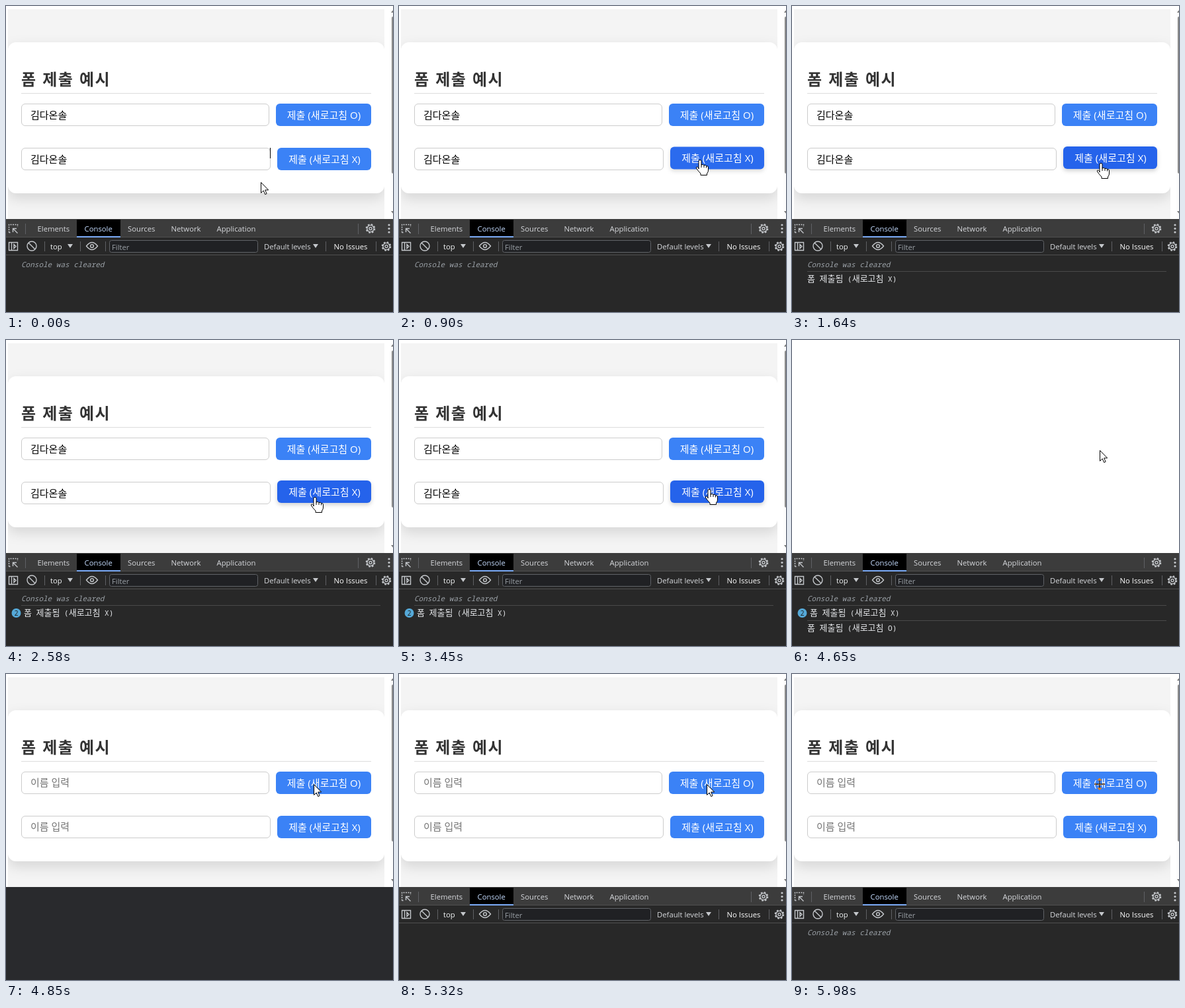
An HTML page that plays this animation: 585x464 px, repeating every 6.12 s.

```html
<!DOCTYPE html>
<html lang="ko">
<head>
<meta charset="utf-8">
<style>
html, body { margin: 0; width: 100%; height: 100%; overflow: hidden; background: #fff; }
svg { display: block; width: 585px; height: 464px; }
text { font-family: "Open Sans", "Noto Sans CJK KR", "Noto Sans CJK", sans-serif; }
.title { font: bold 24px "Noto Sans CJK KR", "Noto Sans CJK", sans-serif; letter-spacing: 1.4px; word-spacing: .7px; fill: #333; }
.page { font-size: 15px; }
.button { fill: #fff; text-anchor: middle; letter-spacing: .05px; }
.hint { fill: #757575; }
.field { fill: #fff; stroke: #ccc; }
.card { fill: #fff; filter: drop-shadow(0 8px 10px rgba(0, 0, 0, .12)); }
.tools text { font-size: 11.3px; fill: #d6d8dc; }
.tools .mono, .tools .mono tspan { font-family: "Noto Sans Mono", "Noto Sans CJK KR", "Noto Sans CJK", monospace; }
.tools .mono { font-size: 11px; fill: #e8eaed; }
.tools .note { font-style: italic; fill: #9aa0a6; }
.icon { fill: none; stroke: #c4c7cb; stroke-width: 1.4; }
.rule { stroke: #4a4a4a; }
.solid { fill: #c4c7cb; stroke: none; }
.cursor { fill: #fff; stroke: #000; stroke-linejoin: round; }
</style>
</head>
<body>
<svg viewBox="0 0 585 464">
  <defs>
    <clipPath id="view"><rect x="3" y="5" width="569" height="318"/></clipPath>
    <g id="gear" class="icon">
      <circle r="6.3" stroke-width="2" stroke-dasharray="2.6 2.35"/>
      <circle r="5.1"/><circle r="2"/>
    </g>
  </defs>

  <g id="site">
    <g clip-path="url(#view)">
      <rect x="3" y="5" width="569" height="318" fill="#f4f4f4"/>
      <rect class="card" x="3" y="55" width="569" height="229" rx="12"/>
    </g>
    <text class="title" x="23" y="120">폼 제출 예시</text>
    <path d="M23 132.5H552" stroke="#ddd"/>
    <rect class="field" x="23.5" y="148.5" width="374" height="33" rx="5.5"/>
    <rect class="field" x="23.5" y="215.5" width="376" height="33" rx="5.5"/>
    <g id="filled" class="page">
      <text x="37" y="170.5">김다온솔</text>
      <text x="37" y="237.5">김다온솔</text>
    </g>
    <g id="empty" class="page">
      <text class="hint" x="37" y="169.5">이름 입력</text>
      <text class="hint" x="37" y="236.5">이름 입력</text>
    </g>
    <g id="btnO">
      <rect x="408" y="148" width="144" height="34" rx="6"/>
      <text class="page button" x="480.5" y="170.5">제출 (새로고침 O)</text>
    </g>
    <g id="btnX">
      <rect x="410" y="215" width="142" height="34" rx="6"/>
      <text class="page button" x="481.5" y="237.5">제출 (새로고침 X)</text>
    </g>
    <path id="mark" d="M399.5 215V231" stroke="#000"/>
    <rect x="581" y="5" width="4" height="318" fill="#fcfcfc"/>
    <rect x="583" y="16" width="4" height="238" rx="2" fill="#8b8b8b"/>
    <path d="M582 10l4-5v5zM582 311h4v5z" fill="#777"/>
  </g>

  <rect y="323" width="585" height="141" fill="#292a2d"/>
  <g id="tools" class="tools">
    <rect y="323" width="585" height="28" fill="#3c3c3c"/>
    <rect y="351" width="585" height="113" fill="#282828"/>
    <rect x="107" y="324" width="66" height="27" fill="#000"/>
    <path d="M0 350.5H585M0 377.5H585" stroke="#505050"/>
    <path d="M107 350H173" stroke="#7cacf8" stroke-width="2"/>
    <text x="47.5" y="342">Elements</text>
    <text x="118.5" y="342" style="fill:#c5dcff">Console</text>
    <text x="184" y="342">Sources</text>
    <text x="249.5" y="342">Network</text>
    <text x="318.5" y="342">Application</text>
    <path d="M29.5 330V346M532.5 330V346M58.5 357V372M112.5 357V372M150.5 357V372M483.5 357V372M559.5 357V372" stroke="#5f6064"/>
    <g class="icon">
      <path d="M4.5 343.5V331.5H17.5V335M4.5 343.5H8" stroke-dasharray="2 1.5"/>
      <path d="M17.5 344.5L10.5 337.5M10.5 343V337.5H16"/>
      <path d="M4.5 358.5H17.5V370.5H4.5ZM8.5 358V371M12 361.5L15 364.5L12 367.5Z"/>
      <circle cx="39" cy="364" r="7"/><path d="M34 359L44 369"/>
      <path d="M121.5 364Q130 353 138.5 364Q130 375 121.5 364Z"/>
      <circle cx="130" cy="364" r="2.4"/>
      <g class="solid">
        <circle cx="579" cy="332" r="1.6"/><circle cx="579" cy="337.5" r="1.6"/><circle cx="579" cy="343" r="1.6"/>
        <path d="M93 361h8l-4 6zM464 361h8l-4 6z"/>
      </g>
    </g>
    <use href="#gear" x="551" y="337.5"/>
    <use href="#gear" x="575" y="364.5"/>
    <text x="67" y="369" style="fill:#f1f3f4">top</text>
    <rect x="156.5" y="355.5" width="224" height="18" rx="3" fill="#202124" stroke="#606367"/>
    <text x="160" y="370" style="fill:#9aa0a6">Filter</text>
    <text x="390" y="369">Default levels</text>
    <text x="495.5" y="369" style="fill:#fff">No Issues</text>
    <text id="cleared" class="mono note" x="23" y="396">Console was cleared</text>
    <g id="logX">
      <path class="rule" d="M23 402.5H566"/>
      <text class="mono log" id="lineX" y="418">폼 제출됨 (새로고침 X)</text>
      <g id="badge">
        <circle cx="15.5" cy="414" r="7" fill="#55a9d8"/>
        <text x="15.5" y="418" text-anchor="middle" style="font-size:10px;fill:#1b1b1b">2</text>
      </g>
    </g>
    <g id="logO">
      <path class="rule" d="M23 425.5H566"/>
      <text class="mono log" x="23" y="441">폼 제출됨 (새로고침 O)</text>
    </g>
    <path id="caret" d="M20.5 408V422" stroke="#d0d0d0"/>
  </g>

  <g id="pointer">
    <path id="arrow" class="cursor" d="M.5 .5V16.5L4.2 13L6.7 18.7L9.1 17.6L6.7 12H11.7Z"/>
    <g id="hand" class="cursor">
      <path d="M-2 14V2Q-2 .5 0 .5T2 2V8Q4.500 6.500 6 8.500Q8.500 7.500 9.500 9.500Q12.500 9 12.500 12V16Q12.500 19 10.500 21V23.500H1V21Q-1 19-3 16.500L-5.500 13Q-6 10-3.500 11.500L-2 13Z"/>
      <path d="M2 7.500V12M6 8.500V12M9.500 9.500V12.500" fill="none"/>
    </g>
    <g id="ring" fill="none">
      <circle r="11" stroke="#000"/><circle r="10" stroke="#fff"/>
    </g>
    <g id="cross">
      <path d="M-8 0H8M0-6V6" stroke="#222" stroke-width="1.500"/>
      <path d="M-3-6L0-9L3-6ZM-3 6L0 9L3 6ZM-6-2V2M6-2V2M-3 1H3" fill="#d9822b" stroke="#d9822b"/>
    </g>
  </g>
</svg>
<script>
const LOOP = 6120;
const $ = id => document.getElementById(id);
const clamp = v => Math.max(0, Math.min(1, v));
const mix = (a, b, p) => a + (b - a) * p;
const easeOut = p => 1 - (1 - p) ** 2;
const show = (id, on) => $(id).style.display = on ? '' : 'none';

document.querySelectorAll('.log').forEach(el => {
  el.innerHTML = el.textContent.replace(/[가-힣]+/g, '<tspan font-size="13">$&</tspan>');
});

// Progress in n equal jumps, the first at a and the last at b
function steps(t, a, b, n) {
  const k = Math.floor((t - a) / (b - a) * (n - 1) + 1e-6) + 1;
  return clamp(k / n);
}

function hover(id, p) {
  const tone = [[59, 37], [130, 99], [246, 235]].map(([a, b]) => mix(a, b, p));
  $(id).setAttribute('transform', `translate(0 ${-2 * p})`);
  const rect = $(id).firstElementChild;
  rect.style.fill = `rgb(${tone})`;
  rect.style.filter = p ? `drop-shadow(0 3px 3px rgba(0,0,0,${.18 * p}))` : 'none';
}

function pointerAt(t, enter, leave) {
  if (t < 1640) {
    const p = easeOut(enter);
    return [mix(385, 467, p), mix(267, 227, p)];
  }
  if (t < 3450) return [467, 238];
  const p = easeOut(clamp((leave * 7 - 1) / 6));
  return [mix(469, 465, p), mix(226, 167, p)];
}

function draw(t) {
  const within = (a, b) => t >= a && t < b;
  const enter = steps(t, 570, 1040, 8);
  const leave = steps(t, 3450, 3850, 7);
  const [x, y] = pointerAt(t, enter, leave);
  const reloaded = t >= 4580;
  const cross = t >= 5510;

  show('site', !within(4580, 4780));
  show('filled', !reloaded);
  show('empty', reloaded);
  show('mark', t < 570);
  hover('btnX', clamp((enter - .25) / .5) * (1 - clamp((leave - .15) / .6)));
  hover('btnO', reloaded ? 0 : clamp((leave - .43) / .57));

  show('tools', !within(4710, 5250));
  show('cleared', !within(4710, 5380));
  show('logX', within(1640, 4710));
  show('badge', t >= 2580);
  $('lineX').setAttribute('x', t < 2580 ? 23 : 27);
  show('logO', within(4110, 4710));
  show('caret', within(5510, 5980));

  const onButton = x >= 408 && (y >= 146 && y < 182 || y >= 213 && y < 249);
  const hand = onButton && !reloaded;
  $('pointer').setAttribute('transform', `translate(${Math.round(x)} ${Math.round(y)})`);
  show('hand', hand);
  show('arrow', !hand && !cross);
  show('cross', cross);
  show('ring', within(1510, 1640) || within(2440, 2580) || within(4040, 4110));
}

const start = performance.now();
function tick() {
  draw((performance.now() - start) % LOOP);
  requestAnimationFrame(tick);
}
tick();
</script>
</body>
</html>
```
